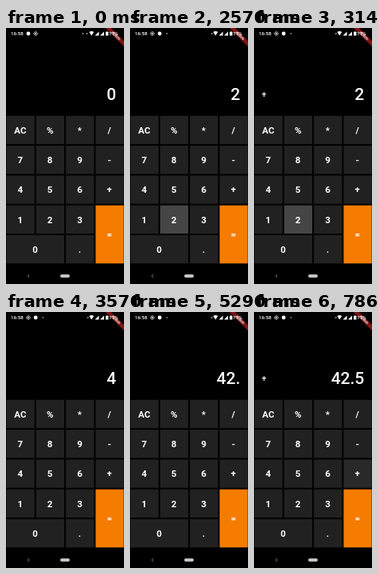
These frames come from a looping animation (148 by 320 pixels, 8000 ms). An HTML page:

```html
<!DOCTYPE html>
<html lang="en">
<head>
<meta charset="utf-8">
<title>Calculator</title>
<style>
  html, body { margin: 0; height: 100%; overflow: hidden; background: #000; }
  svg { display: block; width: 148px; height: 320px; font-family: Roboto, sans-serif; font-weight: 500; fill: #fff; }
  .key { font-size: 11.5px; font-weight: 700; text-anchor: middle; }
  .status { font-size: 6.2px; }
</style>
</head>
<body>
<svg viewBox="0 0 148 320">
  <rect width="148" height="320" fill="#000"/>
  <g transform="translate(148 0) rotate(45)">
    <rect x="-16.4" y="11.5" width="32.8" height="4.9" fill="#b71c1c" opacity=".7"/>
    <text y="15.4" font-size="4.1" font-weight="900" text-anchor="middle" opacity=".85">DEBUG</text>
  </g>
  <g class="status">
    <text x="6" y="9.3">16:58</text>
    <circle id="app" cy="7" r="2.4"/>
    <g id="locate" fill="none" stroke="#fff" stroke-width=".6">
      <circle cy="7" r="2.1"/>
      <circle cy="7" r=".9" fill="#fff" stroke="none"/>
      <path d="M0 4v1M0 9v1M-3 7h1M2 7h1"/>
    </g>
    <circle id="more" cx="46.2" cy="7" r=".7"/>
    <circle id="alert" cx="96.3" cy="7" r=".8"/>
    <circle id="mute" cy="7" r=".8"/>
    <path d="M104.300 5q3-2 6 0l-3 4.600zM111.500 9.600h5v-5zM118 9.600h5v-5zM125 5h1v-.7h1.400v.7h1v4.600h-3.400z"/>
    <text x="129.300" y="9.300">77%</text>
  </g>
  <text id="operator" x="12.700" y="86.500" font-size="10.300" text-anchor="middle">+</text>
  <text id="display" x="138.300" y="89.700" font-size="21" text-anchor="end"></text>
  <g id="keys"></g>
  <clipPath id="equalsArea"><rect x="112.400" y="221.700" width="35.300" height="72.600"/></clipPath>
  <circle id="ripple" cx="130.300" fill="#ccc" opacity=".27" clip-path="url(#equalsArea)"/>
  <path d="M29.300 308l-2 2 2 2" fill="none" stroke="#999" stroke-width=".8"/>
  <rect x="68" y="308" width="12" height="4" rx="2" fill="#c4c4c4"/>
</svg>
<script>
const $ = id => document.getElementById(id);
const PITCH = 37.3, SIZE = 35.3, LEFT = 0.5, TOP = 109.8;
const keyRects = {};

function addKey(label, col, row, cols = 1, rows = 1) {
  const x = LEFT + col * PITCH, y = TOP + row * PITCH;
  const w = SIZE + (cols - 1) * PITCH, h = SIZE + (rows - 1) * PITCH;
  $('keys').insertAdjacentHTML('beforeend',
    `<rect x="${x}" y="${y}" width="${w}" height="${h}"/>
     <text class="key" x="${x + w / 2 - 0.3}" y="${y + h / 2 + 4.2}">${label}</text>`);
  keyRects[label] = $('keys').lastElementChild.previousElementSibling;
}

['AC % * /', '7 8 9 -', '4 5 6 +', '1 2 3'].forEach((line, row) =>
  line.split(' ').forEach((label, col) => addKey(label, col, row)));
addKey('0', 0, 4, 2);
addKey('.', 2, 4);
addKey('=', 3, 3, 1, 2);

// [start, end, key, colour]
const presses = [
  [2570, 2710, '2', '#454545'],
  [2860, 3000, '+', '#454545'],
  [3140, 3290, '2', '#454545'],
  [4710, 4860, '2', '#454545'],
  [5140, 5290, '.', '#454545'],
  [7860, 8000, '+', '#292929'],
];
// [start, end, centre y, radius]
const ripples = [[3430, 3570, 257.5, 35], [6860, 7000, 261, 27.5]];
const readings = [[0, '0'], [2570, '2'], [3430, '4'], [4710, '42'], [5140, '42.'], [5860, '42.5']];

const during = (t, [start, end]) => t >= start && t < end;
const show = (id, on) => $(id).setAttribute('visibility', on ? 'visible' : 'hidden');

function draw() {
  const t = performance.now() % 8000;

  $('display').textContent = readings.findLast(([start]) => t >= start)[1];
  show('operator', during(t, [2860, 3430]) || t >= 7860);

  for (const label in keyRects) {
    const press = presses.find(p => p[2] === label && during(t, p));
    keyRects[label].setAttribute('fill', label === '=' ? '#f57c00' : press ? press[3] : '#212121');
  }

  const ripple = ripples.find(r => during(t, r));
  show('ripple', ripple);
  if (ripple) {
    $('ripple').setAttribute('cy', ripple[2]);
    $('ripple').setAttribute('r', ripple[3]);
  }

  // The status icons swap places in one intermediate step.
  const swap = t < 290 ? 0 : t < 430 ? 0.85 : 1;
  $('app').setAttribute('cx', 28 + 9.2 * swap);
  $('locate').setAttribute('transform', `translate(${37.2 - 9.2 * swap} 0)`);
  show('more', swap > 0);
  show('alert', swap === 0);
  $('mute').setAttribute('cx', swap === 0 ? 101.5 : 102.8);

  requestAnimationFrame(draw);
}
draw();
</script>
</body>
</html>
```
